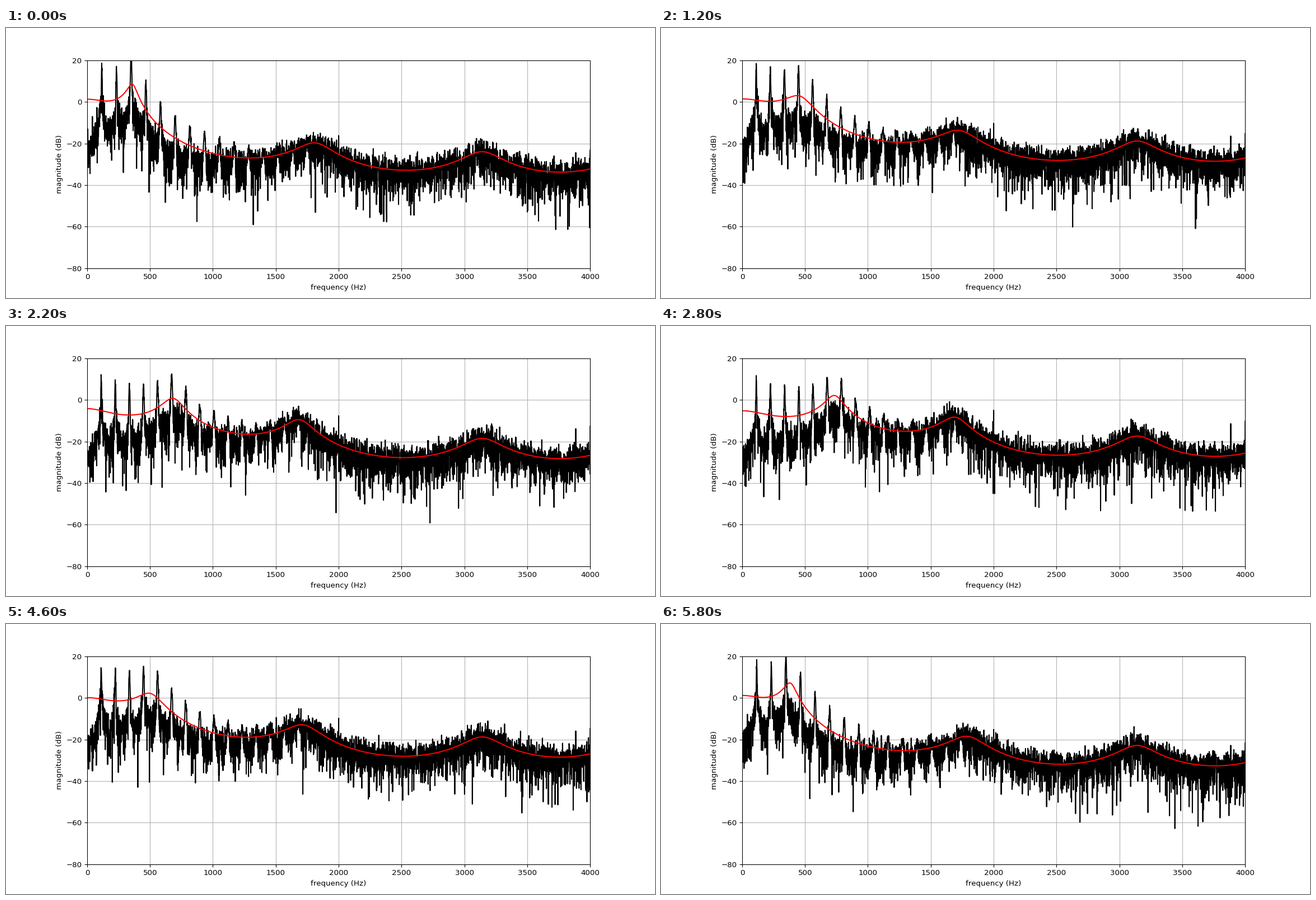
A matplotlib script for the animation above (6 s loop, 1159 by 483 pixels).

```python
import numpy as np
import matplotlib.pyplot as plt
from matplotlib.animation import FuncAnimation

FRAMES, INTERVAL = 30, 200
RATE = 10000
FREQ = np.arange(4001)
OMEGA = 2 * np.pi * FREQ / RATE

# The vowel glides from a closed to an open mouth, then back again.
KEYS = [0, 4, 6, 11, 14]
F1 = [361, 455, 460, 685, 735]
F2 = [1813, 1730, 1725, 1690, 1695]
WIDTH1 = [73, 137, 190, 149, 130]
WIDTH2 = [255, 270, 265, 195, 195]
PITCH = [116.7, 113.7, 112, 112, 112.7]
TILT = [0.9, 0.885, 0.88, 0.885, 0.875]
GAIN = [-24.9, -20.5, -19.8, -19.3, -18.3]


def decibel(power):
    return 10 * np.log10(power)


def power(db):
    return 10 ** (db / 10)


def pole(radius, angle=0):
    """Squared distance from the unit circle to one pole."""
    return 1 + radius**2 - 2 * radius * np.cos(OMEGA - angle)


def envelope(step):
    """All-pole vocal tract: a low-pass tilt and four formants."""
    f1, f2, w1, w2, tilt, gain = (
        np.interp(step, KEYS, values)
        for values in (F1, F2, WIDTH1, WIDTH2, TILT, GAIN))
    denom = pole(tilt)
    for f, width in ((f1, w1), (f2, w2), (3142, 275), (4330, 300)):
        radius, angle = np.exp(-np.pi * width / RATE), 2 * np.pi * f / RATE
        denom = denom * pole(radius, angle) * pole(radius, -angle)
    return gain - decibel(denom)


def spectrum(step, env):
    """Breath noise, pitch harmonics with noisy skirts, and a few hums."""
    rng = np.random.default_rng(40 + step)
    pitch = np.interp(step, KEYS, PITCH)
    gap = np.interp(FREQ, [0, 250, 600, 1000, 1600, 2200],
                    [26, 16, 10, 4, 0.7, 0])
    noise = power(env - gap)
    tones = np.zeros(FREQ.size)
    for n in range(1, 16):
        off = FREQ - n * pitch
        peak = power(env[round(n * pitch)] + 19.5 - 1.25 * n)
        tones += peak * np.exp(-(off / (1.8 + 0.6 * n))**2)
        noise += 0.03 * peak / (1 + (off / 8)**2)**1.25

    grain = np.maximum(rng.exponential(size=FREQ.size), 0.0005)
    db = decibel(noise * grain + tones * rng.uniform(0.3, 1, FREQ.size))
    db[42] = -7 - 0.85 * step
    for f in (2000, 3885, 4000):
        db[f] = env[f] + 9 + 0.45 * step
    return db


# Slightly over 1159 x 483 so that truncation gives whole pixels.
fig, ax = plt.subplots(figsize=(12, 5), dpi=96.601)
ax.set(xlim=(0, 4000), ylim=(-80, 20),
       xlabel="frequency (Hz)", ylabel="magnitude (dB)")
ax.set_xticks(range(0, 4001, 500))
ax.set_yticks(range(-80, 21, 20))
ax.grid(True)
voice_line, = ax.plot([], [], color="black", lw=1.5)
env_line, = ax.plot([], [], color="red", lw=1.5)


def update(i):
    step = min(i, FRAMES - i)
    env = envelope(step)
    voice_line.set_data(FREQ, spectrum(step, env))
    env_line.set_data(FREQ, env)
    return voice_line, env_line


anim = FuncAnimation(fig, update, frames=FRAMES, interval=INTERVAL,
                     repeat=True, repeat_delay=0)
plt.show()
```
